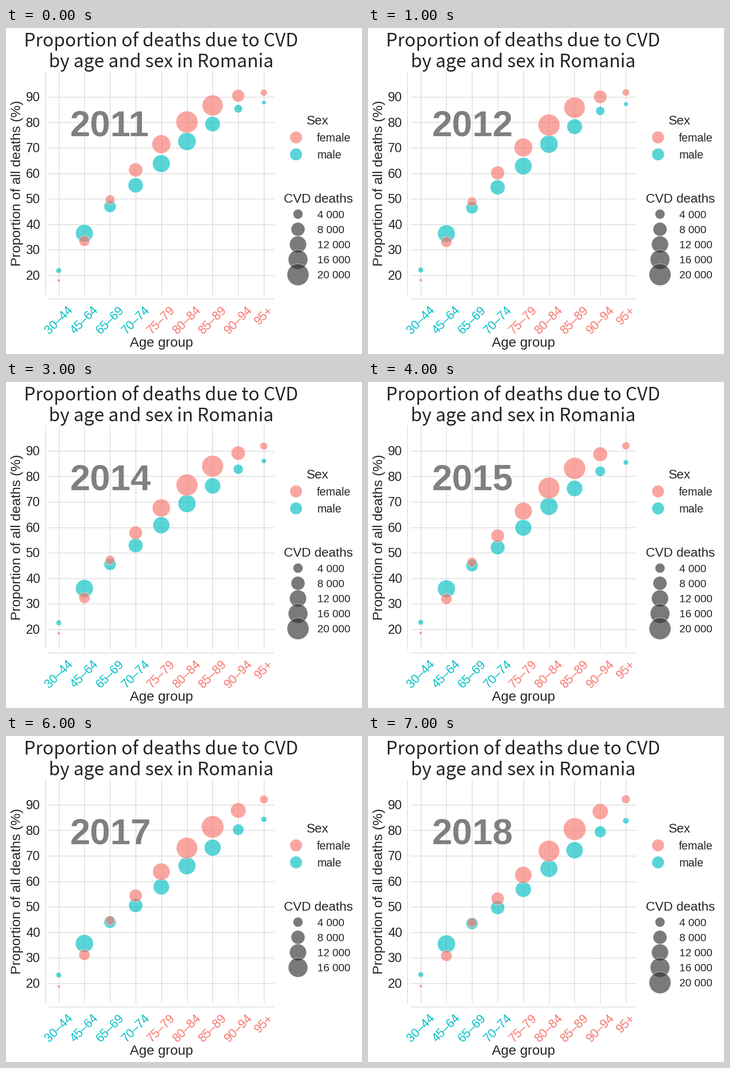
A matplotlib script that plays this animation: 733 px wide and 672 px high, repeating every 8 s.

```python
import matplotlib.pyplot as plt
import numpy as np
from matplotlib.animation import FuncAnimation
from matplotlib.patches import Circle

W, H, DPI = 733, 672, 64
PT = 72 / DPI  # points per pixel
INK, GRID = "#262626", "#cccccc"
SALMON, TEAL = "#F8766D", "#00BFC4"
AGES = ["30–44", "45–64", "65–69", "70–74", "75–79",
        "80–84", "85–89", "90–94", "95+"]
YEARS = range(2011, 2019)
SHORT_LEGEND = (2013, 2016, 2017)  # years with no 20 000 entry

# First year: share of deaths (%) and bubble radius (px) by age group
I = np.arange(len(AGES))
FEMALE = np.array([18.0, 33.5, 49.7, 61.3, 71.4, 80.1, 86.6, 90.4, 91.6])
MALE = np.array([21.9, 36.5, 47.0, 55.3, 63.8, 72.5, 79.3, 85.3, 87.7])
FEMALE_R = np.array([3.2, 11.1, 9.6, 14.3, 19.2, 22.5, 21.4, 13.0, 7.0])
MALE_R = np.array([5.6, 18.0, 12.4, 15.4, 18.0, 18.6, 15.6, 8.6, 4.3])

# Change over the whole period, as smooth waves along the age axis
FEMALE_DROP = 8.9 * np.sin(np.pi * (I - 0.25) / 7.6)
MALE_DROP = 7.5 * np.sin(np.pi * (I - 0.6) / 9)
GROWTH = 0.47 * I * np.sin(2 * np.pi * (I - 5.3) / 6.5)


def age_x(i):
    return 108.6 + 52.8 * i


def share_y(v):
    return 141.7 + (90 - v) * 5.26


fig = plt.figure(figsize=(W / DPI, H / DPI), dpi=DPI, facecolor="white")
ax = fig.add_axes([0, 0, 1, 1])
ax.set_xlim(0, W)
ax.set_ylim(H, 0)
ax.axis("off")


def line(x0, y0, x1, y1):
    ax.plot([x0, x1], [y0, y1], color=GRID, lw=PT, zorder=1,
            solid_capstyle="butt")


def label(x, y, s, px, color=INK, font="Liberation Sans", **kw):
    return ax.text(x, y, s, fontsize=px * PT, color=color, family=font, **kw)


def bubble(x, y, r, color, z):
    return ax.add_patch(Circle((x, y), r, facecolor=color, edgecolor="white",
                               lw=PT, alpha=0.65, zorder=z))


# Title
for y, s in ((38, "Proportion of deaths due to CVD"),
             (81, "by age and sex in Romania")):
    label(319.5, y, s, 37.5, font="Noto Sans CJK JP", ha="center")

# Axes and grid
line(81, 89, 81, 551)
line(87, 558, 552, 558)
for v in range(20, 100, 10):
    line(87, share_y(v), 552, share_y(v))
    label(70.5, share_y(v) + 9.2, str(v), 26.5, ha="right")
for i, age in enumerate(AGES):
    line(age_x(i), 89, age_x(i), 551)
    label(age_x(i), 569.5, age, 25, color=TEAL if i < 4 else SALMON,
          rotation=45, ha="center", va="top")
label(320, 657, "Age group", 28.2, ha="center")
label(30, 319.7, "Proportion of all deaths (%)", 28.2, rotation=90,
      rotation_mode="anchor", ha="center", va="baseline")

# Legends
label(618.7, 199, "Sex", 26.4)
for y, s, color in ((225.5, "female", SALMON), (260.5, "male", TEAL)):
    bubble(597.2, y, 12.7, color, 3)
    label(640, y + 8.5, s, 23.3)
label(572, 360, "CVD deaths", 26.4)
for k in range(1, 6):
    y = 383.7 + 31.2 * (k - 1)
    dot = bubble(601.2, y, 22.4 * np.sqrt(k / 5), "#333333", 3 + k)
    count = label(640.6, y + 8, f"{4 * k} 000", 22.3, zorder=10)
top_entry = (dot, count)

year_text = label(131, 222.5, "", 75, color="#808080", weight="bold",
                  zorder=2)
men = [bubble(age_x(i), 0, 1, TEAL, 3) for i in I]
women = [bubble(age_x(i), 0, 1, SALMON, 4) for i in I]


def draw(n):
    t = n / (len(YEARS) - 1)
    year_text.set_text(str(YEARS[n]))
    for dots, share, drop, size in ((men, MALE, MALE_DROP, MALE_R),
                                    (women, FEMALE, FEMALE_DROP, FEMALE_R)):
        for i, dot in enumerate(dots):
            dot.center = (age_x(i), share_y(share[i] - t * drop[i]))
            dot.set_radius(size[i] + t * GROWTH[i])
    for part in top_entry:
        part.set_visible(YEARS[n] not in SHORT_LEGEND)
    return [year_text, *men, *women, *top_entry]


anim = FuncAnimation(fig, draw, frames=len(YEARS), interval=1000, repeat=True)
plt.show()
```
